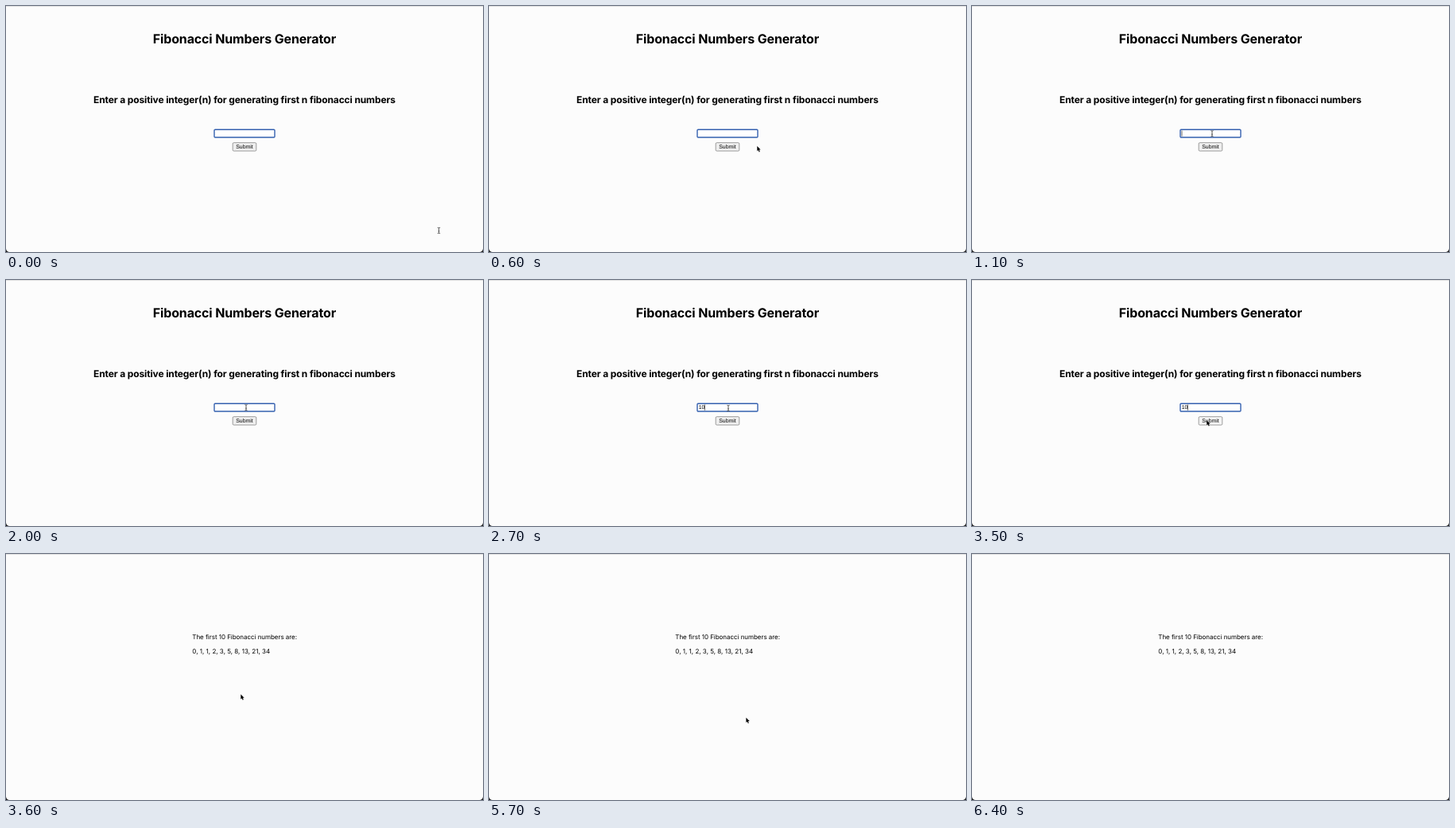
Animation, 600 px wide and 309 px high, one loop 7.1 s. Source, as an HTML page:

```html
<!DOCTYPE html>
<html lang="en">
<head>
<meta charset="utf-8">
<title>Fibonacci Numbers Generator</title>
<style>
  html, body { margin: 0; width: 100%; height: 100%; overflow: hidden; background: #fcfcfc; }
  svg { display: block; width: 100%; height: 100%; }
  text { font-family: Inter, "Open Sans", sans-serif; fill: #000; text-rendering: geometricPrecision; }
  .heading { font-weight: 700; text-anchor: middle; }
  .title { font-size: 16px; letter-spacing: -.145px; }
  .prompt { font-size: 12px; letter-spacing: -.12px; }
  .result { font-size: 8px; letter-spacing: -.04px; }
  #series { letter-spacing: .01px; }
  .control { font-family: "Liberation Sans", Arial, sans-serif; font-size: 6.9px; }
</style>
</head>
<body>
<svg viewBox="0 0 600 309">
  <rect width="600" height="309" fill="#fcfcfc"/>
  <rect width="600" height="1" fill="#e2e2e2"/>

  <g id="form">
    <text class="heading title" x="299.9" y="46.7">Fibonacci Numbers Generator</text>
    <text class="heading prompt" x="299.9" y="122.2">Enter a positive integer(n) for generating first n fibonacci numbers</text>
    <rect x="262" y="155.2" width="76" height="9.8" rx="1" fill="#fff" stroke="#3561b0" stroke-width="1.4"/>
    <text class="control" id="value" x="263.7" y="162.4"></text>
    <rect id="caret" y="156.5" width=".6" height="7.2"/>
    <rect id="button" x="285.2" y="171.7" width="29.6" height="10.4" rx="1.3" stroke="#767676" stroke-width=".7"/>
    <text class="control" x="300" y="179.3" text-anchor="middle">Submit</text>
  </g>

  <g id="answer">
    <text class="result" x="234.3" y="107">The first 10 Fibonacci numbers are:</text>
    <text class="result" id="series" x="234.3" y="124.9"></text>
  </g>

  <path d="M0 304.5V309H4.5A4.5 4.5 0 0 1 0 304.5M600 304.5V309H595.5A4.5 4.5 0 0 0 600 304.5" fill="#222"/>

  <path id="arrow" d="M0 0V6.3L1.4 5 2.4 7.4 3.5 6.9 2.5 4.6H4.4Z" stroke="#fff" stroke-width=".7" paint-order="stroke"/>
  <path id="beam" d="M-1.6-3.7Q0-3.7 0-2.7Q0-3.7 1.6-3.7M0-2.7V2.7M-1.6 3.7Q0 3.7 0 2.7Q0 3.7 1.6 3.7M-.8 .9H.8" fill="none" stroke="#333" stroke-width=".8"/>
</svg>
<script>
const LOOP = 7100, TICK = 100, PRESS_AT = 3500, RESULT_AT = 3600;
const $ = id => document.getElementById(id);
const show = (id, on) => $(id).setAttribute("visibility", on ? "visible" : "hidden");

// Pointer stops: time, shape, x, y. Each holds until the next.
const pointer = [
  [0, "beam", 544.5, 282],
  [100, "arrow", 520, 266], [200, "arrow", 460, 230], [300, "arrow", 395, 192], [400, "arrow", 358, 176],
  [600, "arrow", 337.3, 176], [700, "arrow", 322, 168],
  [800, "beam", 310, 155], [900, "beam", 304, 158], [1000, "beam", 302, 160.3],
  [2100, "none", 0, 0],
  [2700, "beam", 301, 161],
  [2800, "arrow", 296, 170], [2900, "arrow", 289, 187], [3000, "arrow", 287, 184.2],
  [3100, "arrow", 289, 182], [3200, "arrow", 293, 178], [3300, "arrow", 295.3, 176.2],
  [5700, "arrow", 323.4, 205.4], [5800, "arrow", 380, 252], [5900, "arrow", 439, 303],
  [6200, "arrow", 437, 160], [6300, "arrow", 432, 1],
  [6400, "none", 0, 0]
];

const fibonacci = [0, 1];
while (fibonacci.length < 10) fibonacci.push(fibonacci.at(-1) + fibonacci.at(-2));
$("series").textContent = fibonacci.join(", ");

// The caret blinks every half second and restarts with each key.
function caretVisible(t) {
  const start = t < 2100 ? 100 : t < 2300 ? 2100 : 2300;
  return t >= 100 && Math.floor((t - start) / 500) % 2 === 0;
}

function draw(time) {
  const t = Math.floor(time % LOOP / TICK) * TICK;
  const [, shape, x, y] = pointer.findLast(stop => stop[0] <= t);
  const typed = t < 2100 ? "" : t < 2300 ? "1" : "10";
  const onForm = t < RESULT_AT;
  const hover = shape === "arrow" && x > 285 && x < 315 && y > 171.5 && y < 182.5;

  $("form").style.display = onForm ? "" : "none";
  $("answer").style.display = onForm ? "none" : "";
  $("value").textContent = typed;
  $("caret").setAttribute("x", 263.7 + typed.length * 3.84);
  show("caret", onForm && caretVisible(t));
  $("button").setAttribute("fill", t >= PRESS_AT ? "#f5f5f5" : hover ? "#e5e5e5" : "#efefef");

  for (const id of ["arrow", "beam"]) {
    show(id, id === shape);
    $(id).setAttribute("transform", `translate(${x} ${y})`);
  }
}

const began = performance.now();
function animate() {
  draw(performance.now() - began);
  requestAnimationFrame(animate);
}
animate();
</script>
</body>
</html>
```
